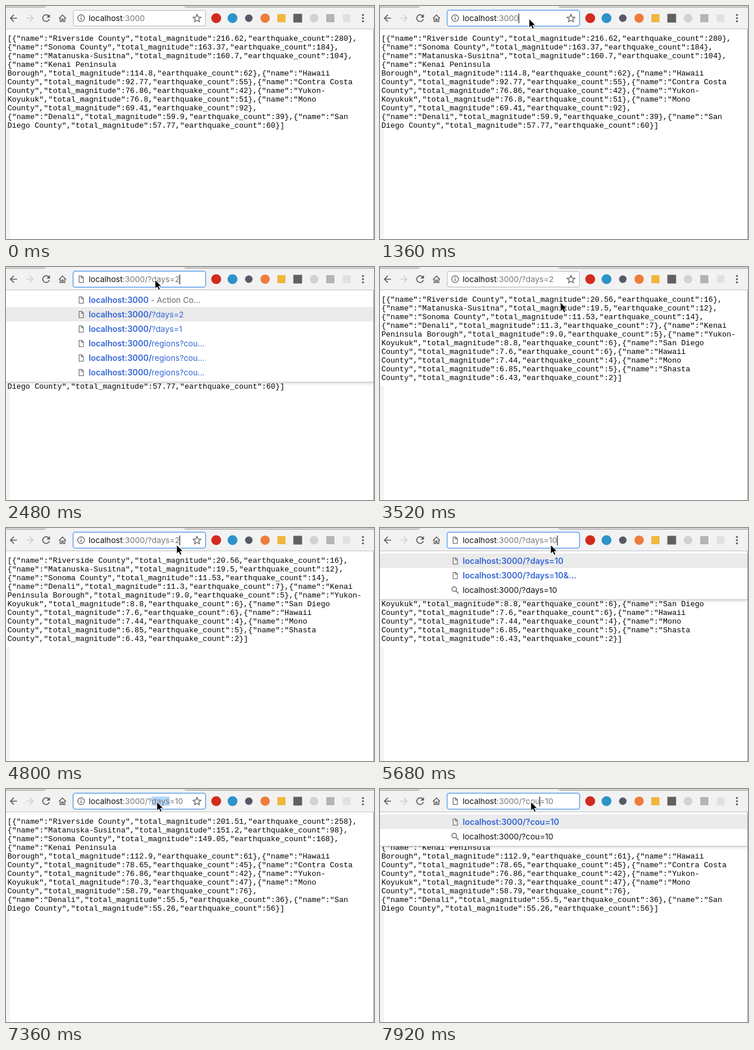
An HTML page for the animation above (8 s loop, 632x402 px).

```html
<!DOCTYPE html>
<html lang="en">
<head>
<meta charset="utf-8">
<title>Earthquake API in a browser</title>
<style>
  html, body { margin: 0; width: 100%; height: 100%; overflow: hidden; background: #fff; }
  #stage { position: relative; width: 632px; height: 402px; overflow: hidden; background: #fff;
    font: 13.65px/26px Inter, sans-serif; font-variant-ligatures: none; color: #111; }
  #stage > * { position: absolute; }
  #strip { left: 0; top: 205px; width: 7px; height: 197px; background: #f4f4f4; }
  #edge { left: 631px; top: 40px; width: 1px; height: 362px; background: #999; }
  #page { left: 2.4px; top: 49px; margin: 0; color: #000;
    font: 13px/15px "Liberation Mono", "Courier New", monospace; }
  #bar { left: 0; top: 0; }
  #box { left: 115px; top: 7px; width: 226px; height: 26px; background: #fff;
    border: 1px solid #b9b9b9; border-radius: 4px; }
  .focus #box { border-color: #5f9fe6; box-shadow: 0 0 0 1px #a9cdf3; }
  #url { left: 142px; top: 8px; white-space: pre; color: #777; }
  #url b { font-weight: 400; color: #111; }
  #url i { display: inline-block; width: 1px; height: 17px; margin-right: -1px;
    vertical-align: -4px; background: #000; }
  #url mark { background: #b3d7ff; color: inherit; }
  #list { left: 0; top: 40px; width: 631px; padding: 4px 0; background: #fff;
    box-shadow: 0 1px 0 #c8c8c8, 0 3px 5px rgba(0, 0, 0, .16); }
  #list:empty { display: none; }
  .row { position: relative; height: 25px; padding-left: 142px; line-height: 25px;
    white-space: pre; color: #3366d6; }
  .row.on { background: #ebebeb; }
  .row b { font-size: 14px; font-weight: 600; }
  .row em { font-style: normal; color: #666; }
  .row.find { color: #111; }
  .row svg { position: absolute; left: 121px; top: 5px; }
  .typed .idle, .busy { display: none; }
  .typed .busy { display: inline; }
  #pointer { left: 0; top: 0; overflow: visible; }
</style>
</head>
<body>
<div id="stage">
  <div id="strip"></div>
  <pre id="page"></pre>
  <div id="edge"></div>
  <svg id="bar" width="632" height="41">
    <rect width="632" height="39" fill="#f2f2f2"/>
    <path d="M0 0H65L68 2H0ZM307 2L310 0H632V2Z" fill="#d4d4d4"/>
    <path d="M0 2.5H66Q68 2 69 0M306 0Q307 2 309 2.5H632" fill="none" stroke="#ababab"/>
    <path d="M0 39.5H632" stroke="#c2c2c2"/>
    <g fill="none" stroke="#5c5c5c" stroke-width="1.7">
      <path d="M19 21H8M13.5 15.2L7.7 21L13.5 26.8"/>
      <path d="M35 21H46M40.500 15.200L46.300 21L40.500 26.800" stroke="#cfcfcf"/>
      <path d="M73.200 17A5.800 5.800 0 1 0 74.500 22.500"/>
      <path d="M91 21.500L97 15.500L103 21.500M93 20.500V26.700H95.800V22.500H98.200V26.700H101V20.500" stroke-width="1.5"/>
    </g>
    <path d="M75.500 14V20H69.500Z" fill="#5c5c5c"/>
    <g fill="#5c5c5c">
      <circle cx="613" cy="15.500" r="1.700"/><circle cx="613" cy="21" r="1.700"/><circle cx="613" cy="26.500" r="1.700"/>
    </g>
    <g id="addons"></g>
  </svg>
  <div id="box"></div>
  <svg id="marks" width="344" height="40" style="left:0;top:0" fill="none" stroke="#5c5c5c" stroke-width="1.300">
    <g class="idle">
      <circle cx="129" cy="21" r="5.800"/>
      <path d="M129 20.200V24.200M129 17.600V19" stroke-width="1.500"/>
      <path d="M328 14.500L329.900 19L334.700 19.400L331 22.500L332.200 27.200L328 24.700L323.800 27.200L325 22.500L321.300 19.400L326.100 19Z"/>
    </g>
    <path class="busy" d="M125.500 15.500H130L133 18.500V26.500H125.500ZM129.700 15.500V19H133" stroke-width="1.100"/>
  </svg>
  <div id="url"></div>
  <div id="list"></div>
  <svg id="pointer" width="20" height="20">
    <path id="arrow" d="M0 0V15.500L3.600 12.200L6 17.700L8.700 16.500L6.300 11.200H11Z" fill="#000" stroke="#fff"/>
    <g id="beam" fill="none">
      <path d="M-3 -7Q0 -7 0 -5Q0 -7 3 -7M0 -5V5M-3 7Q0 7 0 5Q0 7 3 7M-2 2H2" stroke="#fff" stroke-width="3"/>
      <path d="M-3 -7Q0 -7 0 -5Q0 -7 3 -7M0 -5V5M-3 7Q0 7 0 5Q0 7 3 7M-2 2H2" stroke="#222" stroke-width="1.200"/>
    </g>
  </svg>
</div>
<script>
  const $ = id => document.getElementById(id);
  const LOOP = 8000, STEP = 80;

  // Each entry: name, magnitude, count. "\n" marks where the line wraps.
  const json = list => '[' + list.map(entry => {
    const [, wrap, name, mag, count] = entry.match(/^(\n?)([^,]+),(.+),(.+)$/);
    return `${wrap}{"name":"${name}","total_magnitude":${mag},"earthquake_count":${count}}`;
  }).join(',') + ']';

  const pages = {
    blank: '',
    month: json(['Riverside County,216.62,280', '\nSonoma County,163.37,184',
      '\nMatanuska-Susitna,160.7,104', '\nKenai Peninsula\nBorough,114.8,62',
      'Hawaii\nCounty,92.77,55', 'Contra Costa\nCounty,76.86,42', 'Yukon-\nKoyukuk,76.8,51',
      'Mono\nCounty,69.41,92', '\nDenali,59.9,39', 'San\nDiego County,57.77,60']),
    two: json(['Riverside County,20.56,16', '\nMatanuska-Susitna,19.5,12',
      '\nSonoma County,11.53,14', '\nDenali,11.3,7', 'Kenai\nPeninsula Borough,9.0,5',
      'Yukon-\nKoyukuk,8.8,6', 'San Diego\nCounty,7.6,6', 'Hawaii\nCounty,7.44,4',
      'Mono\nCounty,6.85,5', 'Shasta\nCounty,6.43,2']),
    ten: json(['Riverside County,201.51,258', '\nMatanuska-Susitna,151.2,98',
      '\nSonoma County,149.05,168', '\nKenai Peninsula\nBorough,112.9,61',
      'Hawaii\nCounty,78.65,45', 'Contra Costa\nCounty,76.86,42', 'Yukon-\nKoyukuk,70.3,47',
      'Mono\nCounty,58.79,76', '\nDenali,55.5,36', 'San\nDiego County,55.26,56'])
  };

  // Suggestions: bold|plain|note, "~" marks a search row.
  const host = 'localhost:3000';
  const regions = Array(3).fill(host + '/|regions?cou...');
  const recent = [host + '|| - Action Co...', host + '/|?days=2', host + '/|?days=1', ...regions];
  const both = q => [host + q, '~|' + host + q];

  // In a url, "|" is the caret and "[ ]" the selection.
  const changes = [
    { at: 0, url: host, rows: [], on: 0, page: 'month', focus: false, lit: false },
    { at: 880, url: `[${host}]`, focus: true },
    { at: 1360, url: host + '|' },
    { at: 1680, url: host + '/|', rows: recent },
    { at: 2240, url: host + '/' },
    { at: 2480, url: host + '/?days=2|', on: 1 },
    { at: 2800, url: host + '/?days=2', rows: [], on: 0, page: 'blank', focus: false },
    { at: 2960, page: 'two' },
    { at: 4240, url: `[${host}/?days=2]`, focus: true },
    { at: 4800, url: host + '/?days=2|' },
    { at: 5280, url: host + '/?days=|',
      rows: [host + '/?days=', host + '/?days=|2', host + '/?days=|1', host + '/?days=|10', ...regions.slice(1)] },
    { at: 5520, url: host + '/?days=1|',
      rows: [host + '/?days=1', host + '/?days=1|0', host + '/?days=1|0&...', '~|' + host + '/?days=1'] },
    { at: 5680, url: host + '/?days=10|',
      rows: [host + '/?days=10', host + '/?days=10&...', '~|' + host + '/?days=10'] },
    { at: 5920, url: host + '/?days=10', rows: [], page: 'blank', focus: false },
    { at: 6080, page: 'ten' },
    { at: 6320, lit: true },
    { at: 7200, url: `[${host}/?days=10]`, focus: true, lit: false },
    { at: 7360, url: host + '/?[days]=10' },
    { at: 7680, url: host + '/?c|=10', rows: both('/?c=10') },
    { at: 7760, url: host + '/?co|=10', rows: both('/?co=10') },
    { at: 7920, url: host + '/?cou|=10', rows: both('/?cou=10') }
  ];
  const states = [];
  changes.forEach((c, i) => states.push({ ...states[i - 1], ...c }));

  // Pointer stops: time, x, y
  const path = [
    [160, 430, 410], [800, 256, 22], [2960, 256, 22], [3360, 312, 66], [3760, 306, 52],
    [4240, 293, 29], [6240, 293, 29], [6480, 290, 17], [6560, 290, 17], [7040, 259, 22], [8000, 259, 22]
  ];

  // Toolbar add-ons: colour, size, round
  const addons = [
    ['#d32a1e', 17, 1], ['#2d93c8', 17, 1], ['#555a66', 13, 1], ['#ee7d3c', 16, 1], ['#f0b73c', 14, 0],
    ['#606060', 15, 0], ['#d2d2d2', 15, 1], ['#b4b4b4', 14, 0], ['#e0e0e0', 13, 0]
  ];
  $('addons').innerHTML = addons.map(([fill, size, round], i) =>
    `<rect x="${361 + i * 28 - size / 2}" y="${21 - size / 2}" width="${size}" height="${size}" rx="${round * size / 2}" fill="${fill}"/>`
  ).join('');
  const lastAddon = $('addons').lastChild;

  const glyphs = {
    file: 'M4.500 2.500H9L12 5.500V13.500H4.500ZM8.700 2.500V6H12',
    find: 'M10.500 6.500A4 4 0 1 1 2.500 6.500A4 4 0 1 1 10.500 6.500M9.500 9.500L14 14'
  };
  const row = (text, on) => {
    const find = text[0] === '~';
    const [bold, plain = '', note = ''] = text.replace('~', '').replace('&', '&amp;').split('|');
    return `<div class="row${on ? ' on' : ''}${find ? ' find' : ''}">` +
      `<svg width="16" height="16" fill="none" stroke="#666" stroke-width="${find ? 1.5 : 1.1}"><path d="${find ? glyphs.find : glyphs.file}"/></svg>` +
      `<b>${bold}</b>${plain}<em>${note}</em></div>`;
  };

  function show(s) {
    $('page').textContent = pages[s.page];
    $('url').innerHTML = s.url.replace('localhost', '<b>localhost</b>')
      .replace('|', '<i></i>').replace('[', '<mark>').replace(']', '</mark>');
    $('list').innerHTML = s.rows.map((r, i) => row(r, i === s.on)).join('');
    $('stage').className = (s.focus ? 'focus ' : '') + (s.rows.length ? 'typed' : '');
    lastAddon.setAttribute('fill', s.lit ? '#505050' : '#e0e0e0');
  }

  function movePointer(t) {
    const i = Math.max(1, path.findIndex(p => p[0] > t));
    const [t0, x0, y0] = path[i - 1], [t1, x1, y1] = path[i];
    const u = Math.max(0, (t - t0) / (t1 - t0)), k = u * u * (3 - 2 * u);
    const beam = t >= 6400 && t < 7040;
    $('pointer').style.transform = `translate(${x0 + (x1 - x0) * k}px, ${y0 + (y1 - y0) * k}px)`;
    $('pointer').style.display = t < 240 ? 'none' : 'block';
    $('arrow').style.display = beam ? 'none' : 'inline';
    $('beam').style.display = beam ? 'inline' : 'none';
  }

  const start = performance.now();
  let shown;
  function tick() {
    const t = Math.floor((performance.now() - start) % LOOP / STEP) * STEP;
    const state = states.filter(s => s.at <= t).pop();
    if (state !== shown) show(shown = state);
    movePointer(t);
    requestAnimationFrame(tick);
  }
  tick();
</script>
</body>
</html>
```
